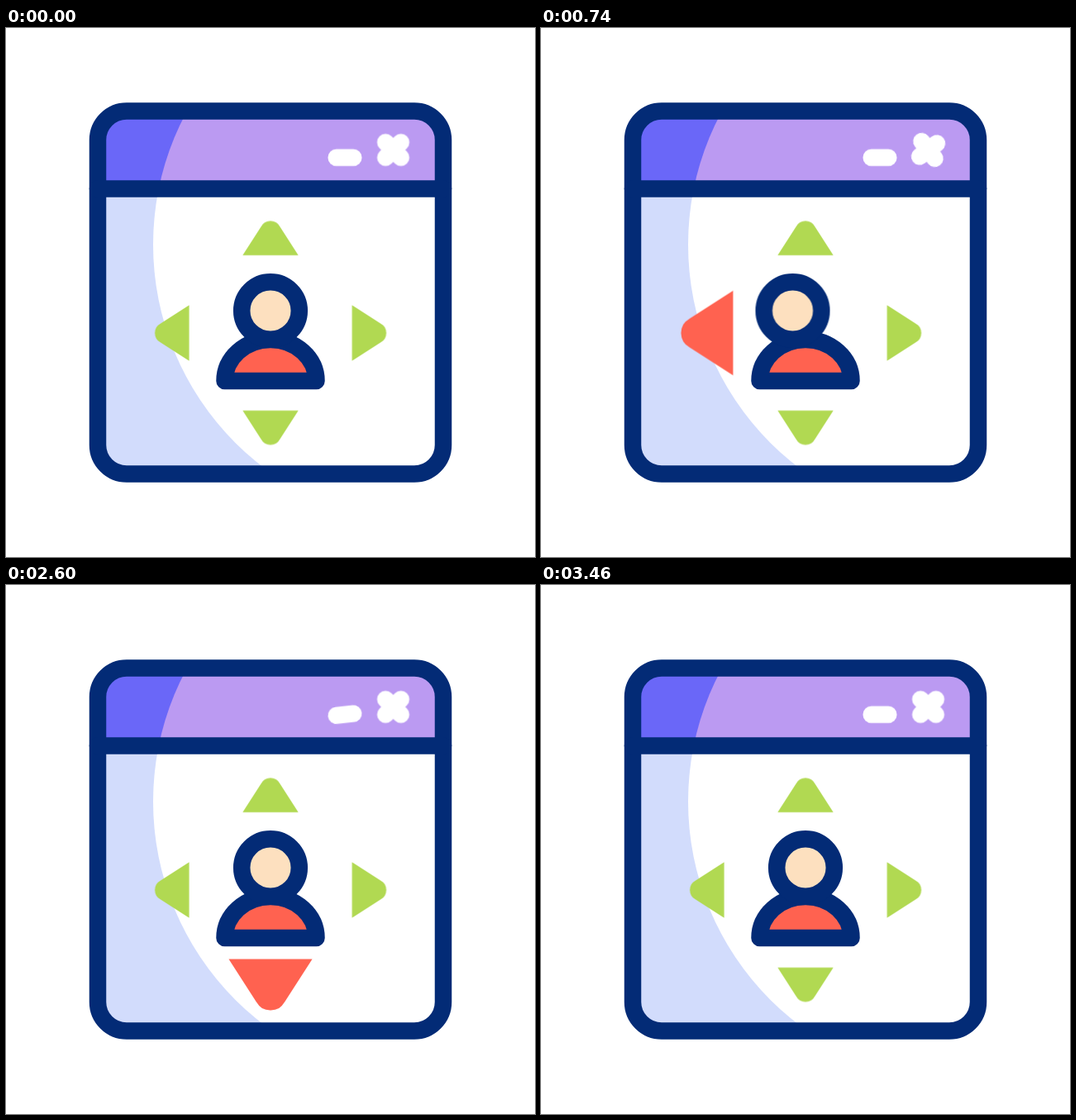
Write an HTML page that moves like this. It is 640 px wide and 640 px high and loops after 3.6 s.

```html
<!DOCTYPE html>
<html lang="en">
<head>
<meta charset="utf-8">
<title>Move in window</title>
<style>
html, body { margin: 0; width: 100%; height: 100%; overflow: hidden; background: #fff; }
svg { display: block; width: 100%; height: 100%; }

.ink { stroke: #032b76; stroke-width: 20.5; stroke-linecap: round; stroke-linejoin: round; }
.icon { fill: none; stroke: #fff; stroke-width: 20.5; stroke-linecap: round; }
.arrow { fill: #b1d952; }

.window, .head, .arrow, .close, .minus {
  animation: 3600ms cubic-bezier(.333, 0, .667, 1) infinite;
}
.window { transform-origin: 320px 320px; animation-name: window; }
.head { animation-name: head; }
.left { animation-name: left; }
.right { animation-name: right; }
.up { animation-name: up; }
.down { animation-name: down; }
.close { animation-name: close; }
.minus { animation-name: minus; }

@keyframes window {
  0%, 5.556%, 16.667%, 83.333%, 94.444%, 100% { transform: translate(0, 0) rotate(0deg); }
  11.111% { transform: translate(-35.7px, -54.5px) rotate(-6deg); }
  88.889% { transform: translate(-16.5px, -54.5px) rotate(-6deg); }
}
@keyframes head {
  0%, 2.778%, 52.778%, 100% { transform: translateX(0); }
  12.778%, 28.889% { transform: translateX(-15.5px); }
  34.444%, 47.222% { transform: translateX(15.8px); }
}

/* Arrows swell while active; the colour flips part way through each ramp. */
@keyframes left {
  0%, 5.556%, 35%, 100% { transform: scale(1); }
  11.111%, 29.444% { transform: scale(1.52); }
  0%, 7%, 33.5%, 100% { fill: #b1d952; }
  7.01%, 33.49% { fill: #ff6250; }
}
@keyframes right {
  0%, 29.444%, 52.778%, 100% { transform: scale(1); }
  35%, 47.222% { transform: scale(1.52); }
  0%, 31%, 51.2%, 100% { fill: #b1d952; }
  31.01%, 51.19% { fill: #ff6250; }
}
@keyframes up {
  0%, 47.222%, 70.556%, 100% { transform: scale(1); }
  52.778%, 65% { transform: scale(1.59); }
  0%, 48.8%, 69%, 100% { fill: #b1d952; }
  48.81%, 68.99% { fill: #ff6250; }
}
@keyframes down {
  0%, 65%, 88.889%, 100% { transform: scale(1); }
  70.556%, 83.333% { transform: scale(1.5); }
  0%, 66.6%, 87.3%, 100% { fill: #b1d952; }
  66.61%, 87.29% { fill: #ff6250; }
}

@keyframes close {
  0%, 17.778%, 30.556%, 32.222%, 36.667%, 100% { transform: rotate(0deg) scale(1); }
  21.111% { transform: rotate(8deg) scale(1); }
  26.111% { transform: rotate(-8deg) scale(1); }
  34.444% { transform: rotate(0deg) scale(.96); }
}
@keyframes minus {
  0%, 56.667%, 88.889%, 100% { transform: rotate(0deg); }
  60%, 71.111%, 80.556% { transform: rotate(-8deg); }
  65.556%, 76.667% { transform: rotate(8deg); }
  84.444% { transform: rotate(6.5deg); }
}
</style>
</head>
<body>
<svg viewBox="0 0 640 640">
  <defs>
    <clipPath id="inside"><rect x="111" y="100.5" width="418" height="439" rx="35"/></clipPath>
    <clipPath id="bar"><rect x="111" y="100" width="418" height="94"/></clipPath>
    <path id="tip" d="M-33.7 20.7L-11.5-13.8A13 13 0 0 1 11.5-13.8L33.7 20.7z"/>
  </defs>

  <g class="window">
    <g clip-path="url(#inside)">
      <rect x="101" y="90" width="438" height="460" fill="#d2dcfc"/>
      <circle cx="517" cy="262" r="339" fill="#fff"/>
      <g clip-path="url(#bar)">
        <rect x="101" y="90" width="438" height="110" fill="#6a67f8"/>
        <circle cx="517" cy="262" r="339" fill="#bb9af2"/>
      </g>
    </g>
    <rect class="ink" x="111" y="100.5" width="418" height="439" rx="35" fill="none"/>
    <path class="ink" d="M111 194.5H529"/>

    <g transform="translate(410 156.7)"><path class="icon minus" d="M-10.3 0H10.3"/></g>
    <g transform="translate(468.5 147.5)"><path class="icon close" d="M-9.3-9.3L9.3 9.3M9.3-9.3L-9.3 9.3"/></g>

    <g transform="translate(320 254.2)"><use href="#tip" class="arrow up"/></g>
    <g transform="translate(439.4 369) rotate(90)"><use href="#tip" class="arrow right"/></g>
    <g transform="translate(320 483.6) rotate(180)"><use href="#tip" class="arrow down"/></g>
    <g transform="translate(200.8 369) rotate(-90)"><use href="#tip" class="arrow left"/></g>

    <path class="ink" d="M264.5 427A55.5 50 0 0 1 375.5 427z" fill="#ff6250"/>
    <circle class="ink head" cx="320" cy="342" r="34.8" fill="#fde0bf"/>
  </g>
</svg>
</body>
</html>
```
